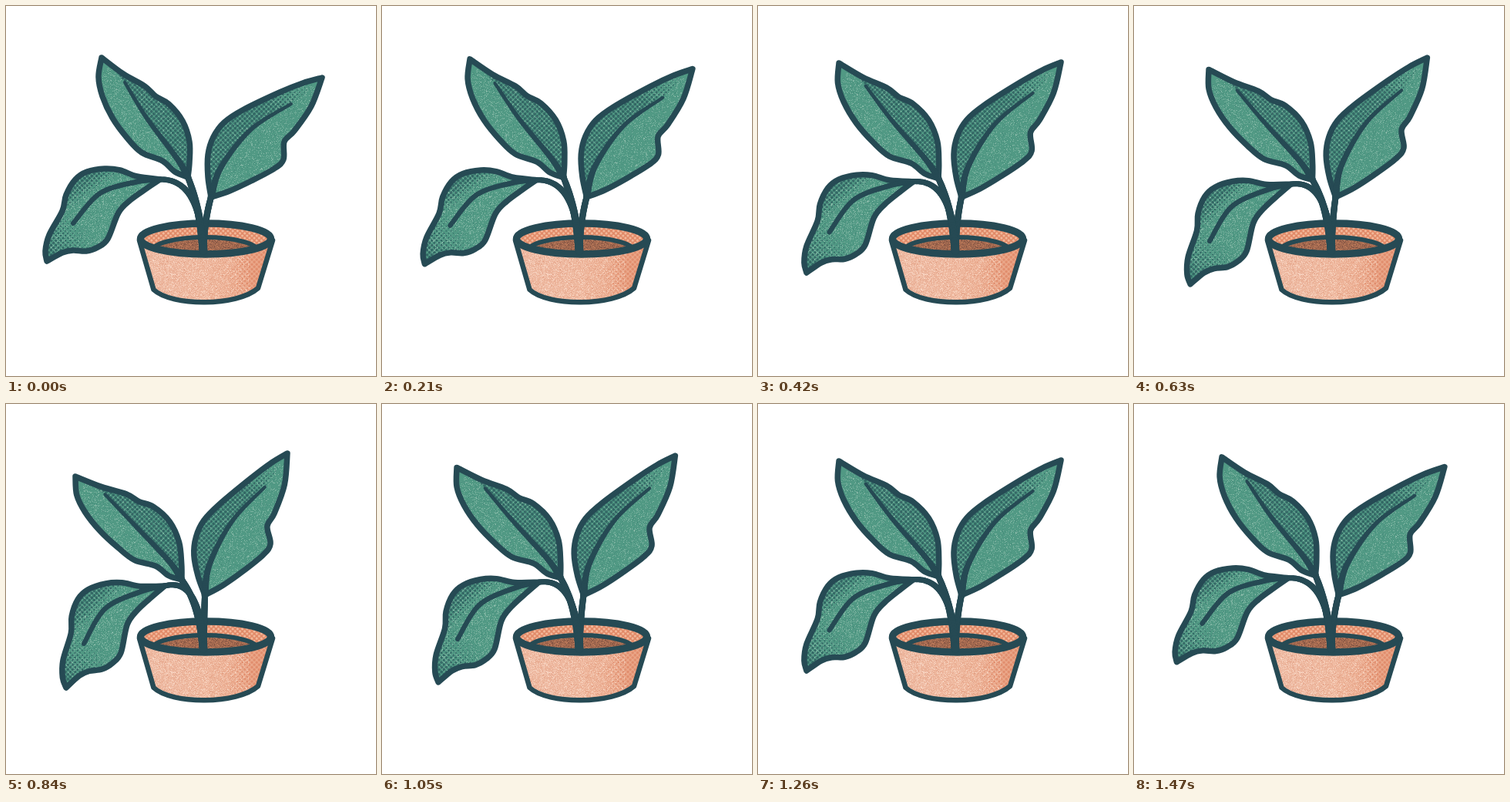
Write an HTML page with a canvas that moves like this. It is 480 px wide and 480 px high and loops after 1.68 s.

```html
<!DOCTYPE html>
<html lang="en">
<head>
<meta charset="utf-8">
<title>Potted plant</title>
<style>
html, body { margin: 0; width: 100%; height: 100%; overflow: hidden; background: #fff; }
canvas { display: block; width: 480px; height: 480px; }
</style>
</head>
<body>
<canvas id="stage" width="480" height="480"></canvas>
<script>
const ctx = document.getElementById('stage').getContext('2d');
const INK = '#264a54';
const STEP = 210;
const FOOT = [256, 318];

const pairs = text => text.split(' ').map(p => p.split(',').map(Number));
const mix = (a, b, k) => a + (b - a) * k;
const mixPoint = (p, q, k) => [mix(p[0], q[0], k), mix(p[1], q[1], k)];
const clamp = x => Math.max(0, Math.min(1, x));
const linear = t => t;
const smooth = t => (1 - Math.cos(Math.PI * t)) / 2;

// Each leaf is outlined once at rest; it swings as its tip follows an arc
// (start, middle, end), its root sinks and its blade bows.
const leaves = [
  {
    tip: pairs('124,67 105,74 90,94'), root: pairs('236,222 228,228'),
    ease: linear, bow: 0.035, bend: [252, 262], rib: [4, 9], stem: [8, 11], shadeSide: true,
    shade: u => (1.02 - u) * 5,
    dark: pairs('152,88 180,104 194,117 211,127 229,149 238,176 238,203'),
    light: pairs('120,92 125,117 138,145 157,171 176,190 203,201 219,215'),
    vein: pairs('154,99 183,146 222,198')
  },
  {
    tip: pairs('410,93 393,73 365,64'), root: pairs('266,248 258,248'),
    ease: linear, bow: 0.02, bend: [257, 280], rib: [4, 9], stem: [8, 9], shadeSide: true,
    shade: u => (1 - u) * 3,
    dark: pairs('385,100 355,112 307,135 283,151 269,170 262,193 262,222'),
    light: pairs('396,130 374,162 361,176 360,199 348,211 318,227 290,240'),
    vein: pairs('370,127 318,160 279,209')
  },
  {
    tip: pairs('53,331 63,346 78,368'), root: pairs('200,225 206,236'),
    ease: smooth, bow: 0.02, bend: [252, 224], rib: [6, 7], stem: [7, 9], shadeSide: false,
    shade: (u, v) => Math.max((u - 0.58) * 3, (v - 0.17) * 8),
    dark: pairs('51,318 56,297 73,266 78,245 90,225 105,215 128,211 148,213 170,221'),
    light: pairs('73,320 87,317 104,318 119,313 132,302 146,268 161,252 182,237'),
    vein: pairs('87,282 122,243 170,228')
  }
];

function random(seed) {
  return () => {
    seed = (seed * 1664525 + 1013904223) >>> 0;
    return seed / 4294967296;
  };
}

// Coordinates along (u) and across (v) the line from root to tip.
function frame(root, tip) {
  const ex = tip[0] - root[0], ey = tip[1] - root[1], d = ex * ex + ey * ey;
  return {
    toLocal([x, y]) {
      const dx = x - root[0], dy = y - root[1];
      return [(dx * ex + dy * ey) / d, (dy * ex - dx * ey) / d];
    },
    toStage: ([u, v]) => [root[0] + u * ex - v * ey, root[1] + u * ey + v * ex]
  };
}

// Point of the parabola through a, b and c at t = 0, 1/2 and 1.
const arc = ([a, b, c], t) => [0, 1].map(i =>
  (1 - 2 * t) * (1 - t) * a[i] + 4 * t * (1 - t) * b[i] + t * (2 * t - 1) * c[i]);

const quad = (a, b, c) => t => mixPoint(mixPoint(a, b, t), mixPoint(b, c, t), t);

// Smooth curve through the points, appended to a path.
function curve(path, pts) {
  for (let i = 0; i < pts.length - 1; i++) {
    const a = pts[i], b = pts[i + 1], p = pts[i - 1] || a, n = pts[i + 2] || b;
    path.bezierCurveTo(a[0] + (b[0] - p[0]) / 6, a[1] + (b[1] - p[1]) / 6,
      b[0] - (n[0] - a[0]) / 6, b[1] - (n[1] - a[1]) / 6, b[0], b[1]);
  }
}

function loop(there, back) {
  const path = new Path2D();
  path.moveTo(...there[0]);
  curve(path, there);
  curve(path, back);
  path.closePath();
  return path;
}

// Position on the same curve for t from 0 to 1.
const along = pts => t => {
  const s = t * (pts.length - 1), i = Math.min(Math.floor(s), pts.length - 2), f = s - i;
  const a = pts[i], b = pts[i + 1], p = pts[i - 1] || a, n = pts[i + 2] || b;
  return [0, 1].map(c => a[c] + f * ((b[c] - p[c]) / 2 +
    f * (p[c] - 2.5 * a[c] + 2 * b[c] - n[c] / 2 +
    f * (1.5 * (a[c] - b[c]) + (n[c] - p[c]) / 2))));
};

function outline(path, width) {
  ctx.strokeStyle = INK;
  ctx.lineWidth = width;
  ctx.stroke(path);
}

function taper(at, [from, to]) {
  for (let i = 0; i < 40; i++) {
    const piece = new Path2D();
    piece.moveTo(...at(i / 40));
    piece.lineTo(...at((i + 1) / 40));
    outline(piece, mix(from, to, i / 39));
  }
}

function clipped(path, draw) {
  ctx.save();
  ctx.clip(path);
  draw();
  ctx.restore();
}

function flood(style) {
  ctx.fillStyle = style;
  ctx.fillRect(0, 0, 480, 480);
}

function halftone(pitch, color, radius) {
  ctx.fillStyle = color;
  ctx.beginPath();
  for (let row = 0, y = 50; y < 390; row++, y += pitch / 2) {
    for (let x = 40 + (row % 2) * pitch / 2; x < 420; x += pitch) {
      const r = radius(x, y);
      if (r < 0.3) continue;
      ctx.moveTo(x + r, y);
      ctx.arc(x, y, r, 0, 7);
    }
  }
  ctx.fill();
}

function speckle(count, seed, color, place) {
  const rnd = random(seed);
  ctx.fillStyle = color;
  for (let i = 0; i < count; i++) {
    const [x, y] = place(rnd(), rnd());
    ctx.fillRect(Math.round(x), Math.round(y), 1, 1);
  }
}

const box = (x, y, w, h) => (a, b) => [x + a * w, y + b * h];

function drawLeaf(leaf, phase) {
  const sag = phase * phase;
  const tip = arc(leaf.tip, leaf.ease(phase));
  const root = mixPoint(...leaf.root, sag);
  const rest = frame(leaf.root[0], leaf.tip[0]), now = frame(root, tip);
  const swing = p => {
    const [u, v] = rest.toLocal(p);
    return now.toStage([u, v + leaf.bow * sag * Math.sin(Math.PI * clamp(u))]);
  };
  const dark = [tip, ...leaf.dark.map(swing), root];
  const light = [root, ...leaf.light.map(swing).reverse(), tip];
  const vein = [...leaf.vein.map(swing), root];
  const blade = loop(dark, light);
  const shaded = leaf.shadeSide ? loop(dark, [root, ...vein.slice(0, -1).reverse(), tip]) : blade;
  const spread = (a, b) => now.toStage([a, (b - 0.5) * 0.9]);

  clipped(blade, () => {
    flood('#519984');
    speckle(6000, 11, 'rgba(178,212,198,.42)', (a, b) => spread(a * 0.92, b));
    speckle(2200, 12, 'rgba(40,100,95,.25)', spread);
  });
  clipped(shaded, () => halftone(6.2, 'rgba(36,80,86,.68)', (x, y) =>
    1.9 * clamp(leaf.shade(...now.toLocal([x, y])))));

  outline(blade, 7.5);
  taper(along(vein), leaf.rib);
  taper(quad(root, leaf.bend, FOOT), leaf.stem);
}

const rim = new Path2D();
rim.ellipse(259, 302, 84.5, 20, 0, 0, 7);
const soil = new Path2D();
soil.ellipse(258, 319, 70, 19, 0, 0, 7);
const body = new Path2D('M173 304 L191.5 368 C215 390 300 390 327 366 L346 304');

function drawPot() {
  clipped(body, () => {
    const tone = ctx.createLinearGradient(180, 0, 340, 0);
    tone.addColorStop(0, '#edb8a0');
    tone.addColorStop(0.5, '#eeb69c');
    tone.addColorStop(1, '#e9a384');
    flood(tone);
    speckle(3200, 5, 'rgba(255,230,216,.45)', box(176, 318, 140, 68));
    speckle(1500, 6, 'rgba(214,138,110,.35)', box(176, 318, 140, 68));
    halftone(6.2, 'rgba(222,130,96,.65)', x => 1.8 * clamp((x - 275) / 45));
  });
  outline(body, 6.5);
  clipped(rim, () => {
    flood('#e18a68');
    halftone(6.2, '#f2b799', () => 1.6);
    clipped(soil, () => {
      flood('#a2694f');
      speckle(900, 8, 'rgba(218,142,105,.5)', box(190, 302, 136, 24));
      speckle(700, 9, 'rgba(105,66,58,.5)', box(190, 302, 136, 24));
    });
    outline(soil, 6);
  });
  outline(rim, 9.5);
}

function draw(phase) {
  flood('#fff');
  ctx.lineJoin = ctx.lineCap = 'round';
  drawPot();
  for (const leaf of leaves) drawLeaf(leaf, phase);
}

// Five held poses, swung through and back.
let shown = -1;
function tick(now) {
  const pose = 4 - Math.abs(4 - Math.floor(now / STEP) % 8);
  if (pose !== shown) draw((shown = pose) / 4);
  requestAnimationFrame(tick);
}
tick(performance.now());
</script>
</body>
</html>
```
